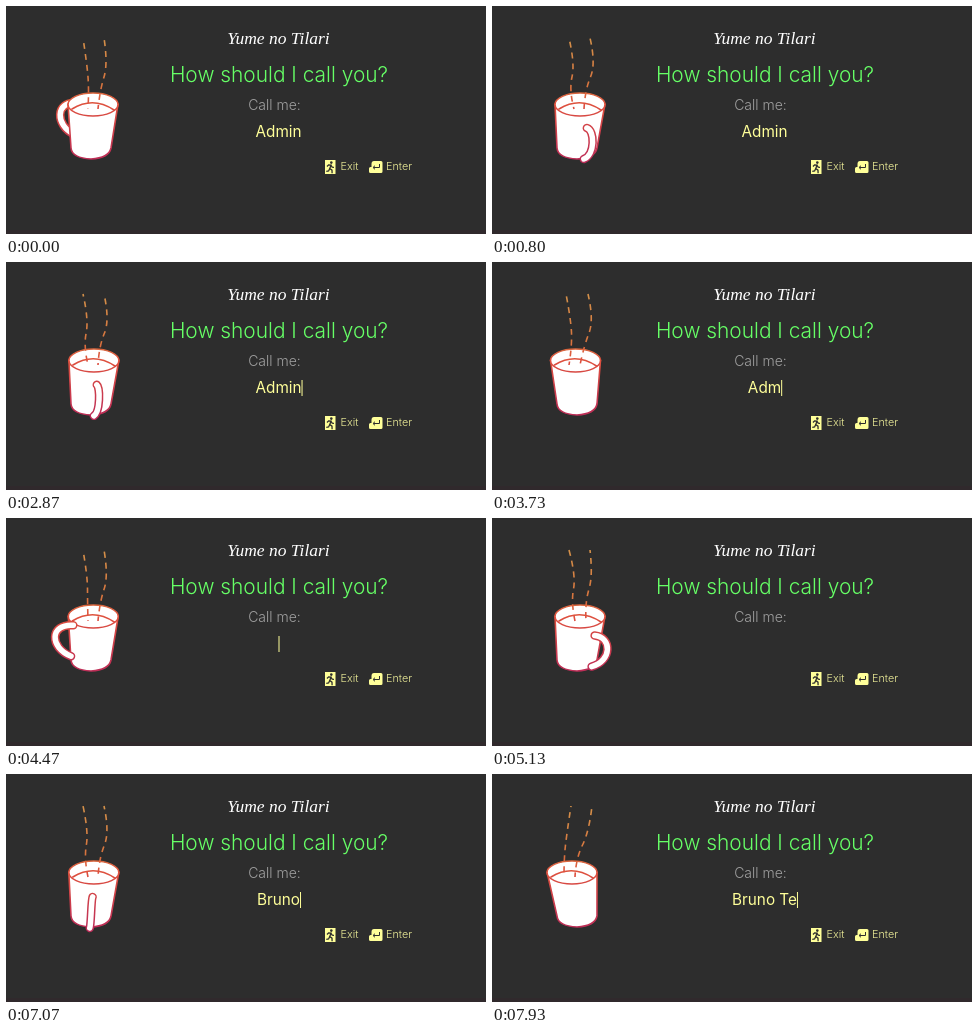
An HTML page for the animation above (8 s loop, 480x228 px).

```html
<!DOCTYPE html>
<html lang="en">
<head>
<meta charset="utf-8">
<title>Call me</title>
<style>
  html, body { margin: 0; width: 100%; height: 100%; overflow: hidden; background: #2d2d2d; }
  svg { display: block; width: 100vw; height: 100vh; }
  text { font-family: Inter, "Open Sans", sans-serif; }
  .mid { text-anchor: middle; }
  .title { font: italic 17.5px "Liberation Serif", serif; fill: #fff; }
  .ask { font-size: 20.9px; font-weight: 300; fill: #66ff66; }
  .label { font-size: 14px; font-weight: 300; fill: #a0a0a0; }
  .name { font-size: 15.3px; font-weight: 400; fill: #ffff99; }
  .button { font-size: 10.8px; font-weight: 300; fill: #eeee99; }
  .ink { stroke: url(#heat); stroke-width: 1.6; stroke-linecap: round; stroke-linejoin: round; }
  .steam { fill: none; stroke-dasharray: 6 5; stroke-linecap: butt; }
</style>
</head>
<body>
<svg viewBox="0 0 480 228">
  <defs>
    <linearGradient id="heat" gradientUnits="userSpaceOnUse" x1="0" y1="30" x2="0" y2="155">
      <stop offset="0" stop-color="#d4924a"/>
      <stop offset=".4" stop-color="#d8743e"/>
      <stop offset=".55" stop-color="#de503e"/>
      <stop offset="1" stop-color="#bd2c58"/>
    </linearGradient>
  </defs>
  <rect width="480" height="228" fill="#2d2d2d"/>
  <rect y="224" width="480" height="4" fill="#30292c"/>

  <g id="mug">
    <g id="handle" fill="none" stroke-linecap="round">
      <path stroke="url(#heat)" stroke-width="8.5"/>
      <path stroke="#fff" stroke-width="5.5"/>
    </g>
    <path id="body" class="ink" fill="#fff"/>
    <ellipse id="rim" class="ink" cy="98.5" rx="25" ry="11.5" fill="#fff"/>
    <path id="coffee" class="ink" fill="none"/>
    <path id="steamLeft" class="ink steam"/>
    <path id="steamRight" class="ink steam"/>
  </g>

  <text class="mid title" x="272.5" y="38">Yume no Tilari</text>
  <text class="mid ask" x="273" y="76">How should I call you?</text>
  <text class="mid label" x="268.5" y="104">Call me:</text>
  <text id="name" class="mid name" x="272.5" y="131"></text>
  <rect id="caret" y="118" width="1" height="16" fill="#ffff99"/>

  <g>
    <rect x="319" y="154" width="10.5" height="14" fill="#ffff99"/>
    <circle cx="325.3" cy="156.6" r="1.3" fill="#2d2d2d"/>
    <path d="M321 160.5l1.6-1.7 2.4.2-1.2 3.6 2.2 1.6.1 3M323.6 162.8l-1 2.2-2.3.3M325 159.4l1.2 1.8 1.8.1"
      fill="none" stroke="#2d2d2d" stroke-width="1.3"/>
    <path d="M368 155h7q1.5 0 1.5 1.5v9q0 1.5-1.5 1.5h-10.5q-1.5 0-1.5-1.5v-3q0-1.500 1.500-1.500h1v-3q0-3 2.500-3z" fill="#ffff99"/>
    <path d="M373.500 158v3.500h-6M369 159.700l-2 1.800 2 1.800" fill="none" stroke="#2d2d2d"/>
    <text class="button" x="334.5" y="164">Exit</text>
    <text class="button" x="380" y="164">Enter</text>
  </g>
</svg>
<script>
const LOOP = 8000, STEP = 1000 / 15, TURN = 32;
const CARET_START = 1750, DELETE_START = 3390, DELETE_STEP = 180;
const TYPE_START = 5480, TYPE_STEP = 310;
const OLD_NAME = "Admin", NEW_NAME = "Bruno Te";
const STEAM_Y = [32, 58, 84, 103];

// phase, handle angle (0 left, 90 front), rim x, four x of left steam, four of right steam
const POSES = [
  [0, -31, 87, 77, 81, 83, 82, 98, 102, 94, 92],
  [12, 110, 88, 77, 83, 77, 82, 98, 104, 93, 92],
  [13, 137, 88, 77, 84, 79, 83, 98, 101, 93, 94],
  [23, 239, 80, 79, 75, 72, 72, 100, 97, 84, 83],
  [24, 249, 83.5, 74, 79, 80, 77, 96, 102, 92, 88],
  [29, 300, 88.5, 75, 89, 87, 82, 94, 104, 101, 97],
  [30, 314, 88.5, 77, 89, 88, 82, 94, 104, 100, 96],
];
POSES.push(POSES[0].map((v, i) => i === 0 ? TURN : i === 1 ? v + 360 : v));

const el = id => document.getElementById(id);
const setPath = (id, d) => el(id).setAttribute("d", d);

function poseAt(phase) {
  const i = POSES.findIndex(p => p[0] > phase);
  const from = POSES[i - 1], to = POSES[i];
  const k = (phase - from[0]) / (to[0] - from[0]);
  return from.map((v, j) => v + (to[j] - v) * k);
}

function drawSteam(id, xs, offset) {
  const [a, b, c, d] = xs.map((x, i) => `${x} ${STEAM_Y[i]}`);
  const mid = `${(xs[1] + xs[2]) / 2} ${(STEAM_Y[1] + STEAM_Y[2]) / 2}`;
  setPath(id, `M${a}Q${b} ${mid}Q${c} ${d}`);
  el(id).setAttribute("stroke-dashoffset", offset);
}

function drawHandle(angle, rimX) {
  const cos = Math.cos(angle * Math.PI / 180), sin = Math.sin(angle * Math.PI / 180);
  const top = 106 + 17 * sin, drop = 5 * Math.max(0, sin);
  const x = rimX - 20 * cos, outer = x - 18 * cos / 0.75;
  const d = `M${x} ${top}C${outer} ${top + drop - 2} ${outer} ${top + drop + 22} ${85 - 20 * cos} ${top + 31}`;
  const handle = el("handle");
  for (const path of handle.children) path.setAttribute("d", d);
  handle.style.display = sin < -0.82 ? "none" : "";
  el("mug").insertBefore(handle, sin > 0 ? el("steamLeft") : el("body"));
}

function drawMug(phase) {
  const [, angle, x, ...steam] = poseAt(phase);
  setPath("body", `M${x - 25} 98L65 142Q66 152 85 153Q103 152 105 142L${x + 25} 98Z`);
  el("rim").setAttribute("cx", x);
  setPath("coffee", `M${x - 21} 103Q${x} 90 ${x + 21} 104`);
  drawHandle(angle, x);
  const rise = phase * 11 * 11 / TURN;
  drawSteam("steamLeft", steam.slice(0, 4), rise - 5);
  drawSteam("steamRight", steam.slice(4), rise - 2);
}

function countSteps(t, start, step, max) {
  return Math.max(0, Math.min(max, Math.floor((t - start) / step) + 1));
}

function drawName(t) {
  const deleted = countSteps(t, DELETE_START, DELETE_STEP, OLD_NAME.length);
  const typed = countSteps(t, TYPE_START, TYPE_STEP, NEW_NAME.length);
  const text = typed ? NEW_NAME.slice(0, typed) : OLD_NAME.slice(0, OLD_NAME.length - deleted);
  const lastKey = typed ? TYPE_START + (typed - 1) * TYPE_STEP
    : deleted ? DELETE_START + (deleted - 1) * DELETE_STEP : CARET_START;
  const name = el("name"), caret = el("caret");
  name.textContent = text;
  caret.setAttribute("x", 272.5 + name.getComputedTextLength() / 2);
  caret.style.display = t >= CARET_START && (t - lastKey) % 1060 < 530 ? "" : "none";
}

function draw(now) {
  // The small lead absorbs frame times rounded down to 10 ms.
  const frame = Math.floor((now % LOOP) / STEP + 0.1);
  drawMug(frame % TURN);
  drawName(frame * STEP);
  requestAnimationFrame(() => draw(performance.now()));
}
draw(0);
</script>
</body>
</html>
```
